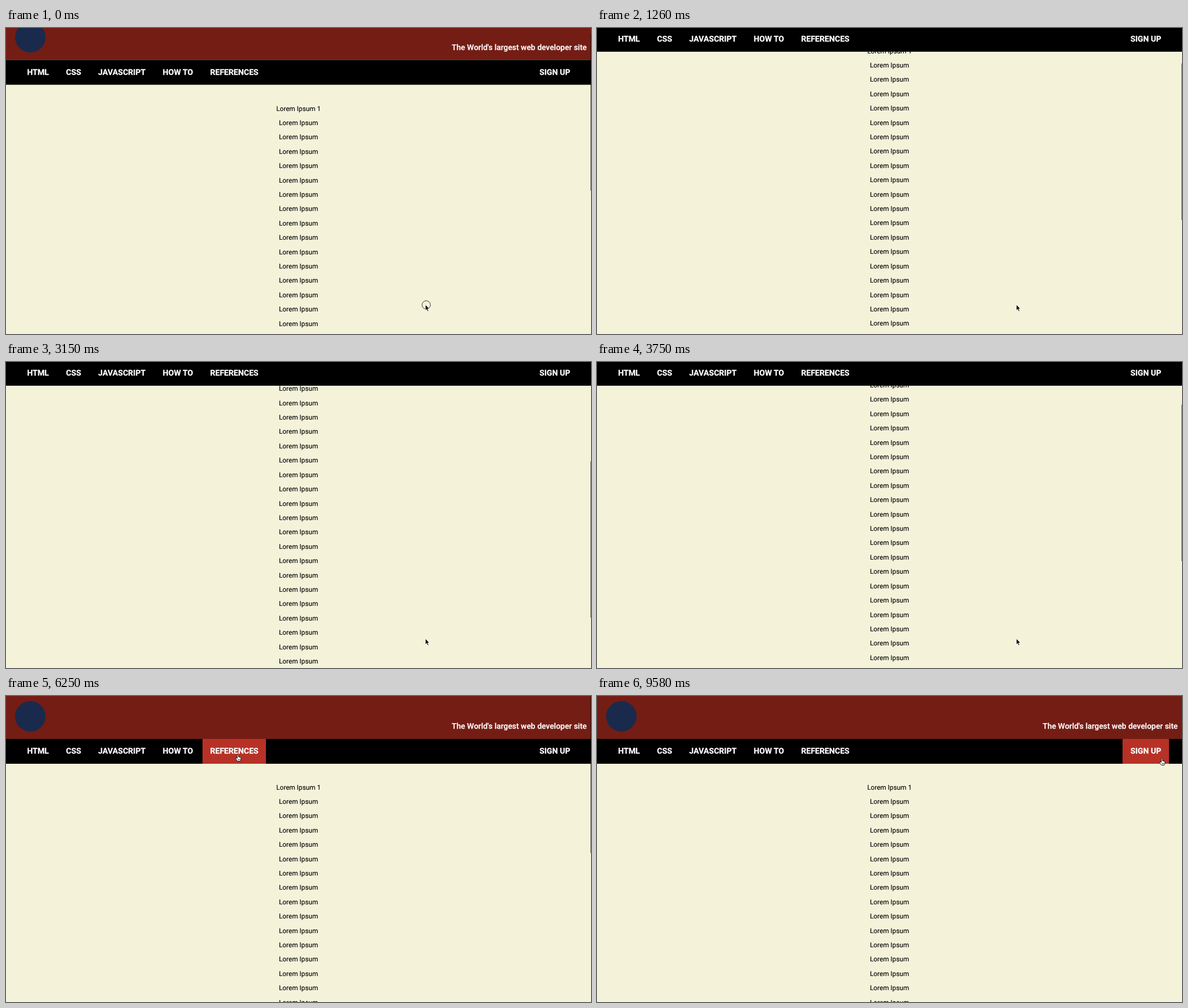
An HTML page for the animation above (9820 ms loop, 1033 px wide and 542 px high).

```html
<!DOCTYPE html>
<html lang="en">
<head>
<meta charset="utf-8">
<title>Sticky navigation</title>
<style>
  html, body { margin: 0; width: 100%; height: 100%; overflow: hidden; }
  body { position: relative; background: #eee; font: 11.75px Roboto, sans-serif; text-rendering: geometricPrecision; color: #000; }
  #page, #nav, #thumb, #cursor { position: absolute; top: 0; left: 0; }
  #page { width: 1033px; height: 1057px; background: #f4f3da; top: -2px; }
  header { position: absolute; top: 0; width: 100%; height: 78px; background: #741d14; }
  .logo { position: absolute; left: 16px; top: 11px; width: 54px; height: 54px; border-radius: 50%; background: #1a2a4c; }
  .tag { position: absolute; right: 7.5px; top: 46px; font-size: 13.9px; font-weight: 500; line-height: 20px; color: #fff; -webkit-text-stroke: .25px; }
  #lines { position: absolute; top: 151.6px; width: 100%; text-align: center; line-height: 25.4px; -webkit-text-stroke: .12px; }
  #nav { box-sizing: border-box; display: flex; gap: 2.9px; width: 1033px; height: 44.4px; padding: 0 23px 0 23.6px; background: #000; }
  #nav a { padding: 0 13.7px; font-size: 14.1px; font-weight: 700; line-height: 44.4px; white-space: nowrap; color: #fff; -webkit-text-stroke: .25px; }
  #nav a:last-child { margin-left: auto; }
  #nav a.on { background: #b73126; }
  #thumb { left: 1032px; width: 1px; height: 276.5px; background: rgba(0, 0, 0, .6); }
  #cursor { width: 1px; height: 1px; overflow: visible; }
</style>
</head>
<body>
<div id="page">
  <header>
    <div class="logo"></div>
    <div class="tag">The World's largest web developer site</div>
  </header>
  <div id="lines"></div>
</div>
<div id="nav">
  <a>HTML</a>
  <a>CSS</a>
  <a>JAVASCRIPT</a>
  <a>HOW TO</a>
  <a>REFERENCES</a>
  <a>SIGN UP</a>
</div>
<div id="thumb"></div>
<svg id="cursor">
  <circle id="ring" cx="1.5" cy=".5" r="7.4" fill="none" stroke="#000" stroke-width=".8"/>
  <path id="arrow" d="M0 0V10.4L2.4 8.2L4 12L5.8 11.2L4.2 7.5H7.3Z" stroke="#fff" stroke-width=".8"/>
  <path id="hand" d="M-1.2 1Q-1.2-.2-.2-.2T.9 1V4.2L4.3 5Q5.6 5.3 5.4 6.8L4.8 9.8L4.2 12H-.8L-3.7 8Q-4.6 6.5-3.7 6.1T-1.2 7.2ZM1 8.2V10.2M2.8 8.2V10.2" fill="#fff" stroke="#000" stroke-width=".9"/>
</svg>
<script>
const LOOP = 9820;
const $ = id => document.getElementById(id);
const items = [...document.querySelectorAll('#nav a')];
const smooth = p => p * p * (3 - 2 * p);

// Progress from 0 to 1 in even jumps, the first at start and the last at end.
function glide(t, start, end, gap) {
  const jumps = Math.round((end - start) / gap);
  const done = Math.floor((t - start) / (end - start) * jumps + 1e-6) + 1;
  return Math.min(1, Math.max(0, done / (jumps + 1)));
}

function scrollAt(t) {
  const part = (start, end) => glide(t, start, end, 150);
  return 19.5 + 145 * part(320, 1710) + 190.5 * part(2010, 3000)
    - 358 * smooth(part(3150, 4280)) + 3 * part(4460, 4640);
}

function pointerAt(t) {
  let x = 740.5, y = 490;
  const move = (start, end, toX, toY) => {
    const p = smooth(glide(t, start, end, 60));
    x += (toX - x) * p;
    y += (toY - y) * p;
  };
  move(5110, 5290, 481, 282);
  move(5350, 5660, 415.5, 140.5);
  move(5960, 6250, 409.5, 103.5);
  move(6660, 7090, 322, 100);
  move(7480, 7770, 232.5, 98.5);
  move(8420, 8700, 118, 104);
  move(8770, 9460, 733, 147);
  move(9520, 9580, 997.5, 110.5);
  return [x, y];
}

const show = (id, on) => { $(id).style.display = on ? '' : 'none'; };
const place = (id, x, y) => { $(id).style.transform = `translate(${x}px, ${y}px)`; };

function draw(t) {
  const scroll = scrollAt(t);
  const [x, y] = pointerAt(t);
  const navTop = Math.max(-2, 76 - scroll);

  place('page', 0, -scroll);
  place('nav', 0, navTop);
  place('thumb', 0, 1 + scroll * .51);
  place('cursor', x, y);

  const inNav = y >= navTop && y < navTop + 44;
  const hovered = items.find(a => inNav && x >= a.offsetLeft && x < a.offsetLeft + a.offsetWidth);
  for (const item of items) item.classList.toggle('on', item === hovered);
  show('hand', hovered);
  show('arrow', !hovered);
  show('ring', t < 320);
  show('thumb', t < 8770);
}

$('lines').innerHTML = Array.from({ length: 34 }, (_, i) => `<div>Lorem Ipsum${i ? '' : ' 1'}</div>`).join('');

const began = performance.now();
function tick() {
  draw((performance.now() - began) % LOOP);
  requestAnimationFrame(tick);
}
tick();
</script>
</body>
</html>
```
